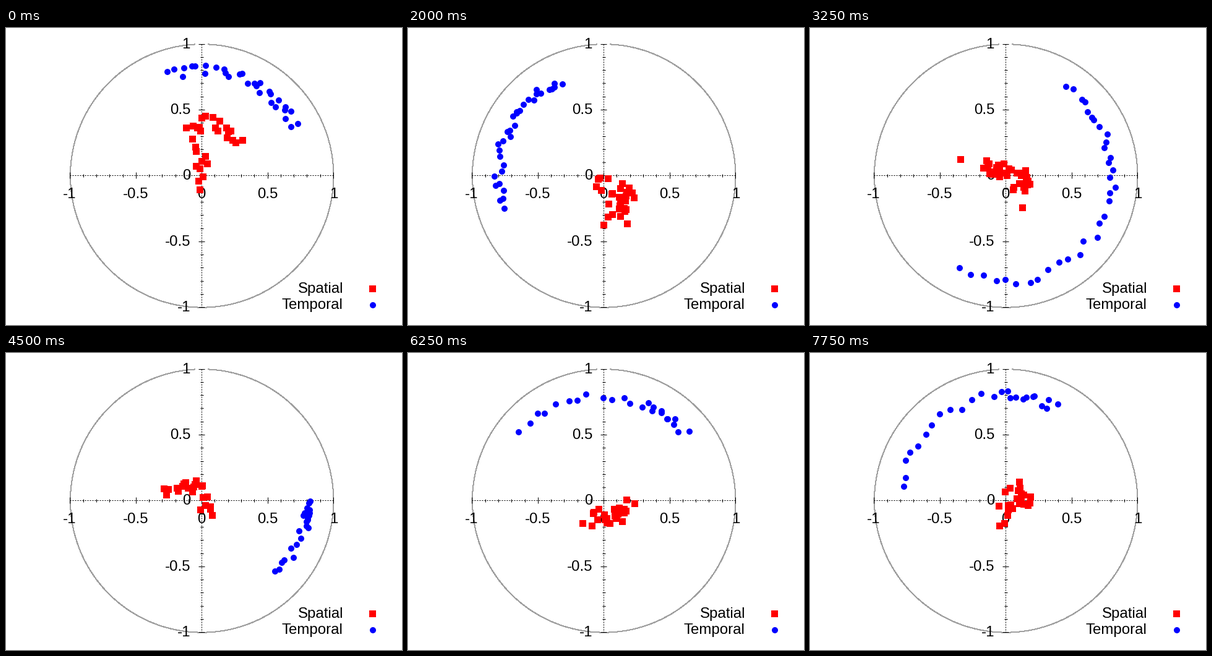
Write a matplotlib script that moves like this. It is 640 px wide and 480 px high and loops after 8000 ms.

```python
import matplotlib.pyplot as plt
import numpy as np
from matplotlib.animation import FuncAnimation
from matplotlib.markers import MarkerStyle
from matplotlib.transforms import Affine2D

W, H, DPI = 640, 480, 100
CX, CY, R = 316.2, 238.4, 212.75
PX = 72 / DPI
FRAMES, STEP = 32, 250

# Temporal arc: step, then first, middle and last angle, turning clockwise
SWEEP = np.array([
    (0, 109, 62, 28),
    (5, 28, 0, -34),
    (8, -162, -209, -246),
    (13, -305, -372, -476),
    (18, -721, -731, -765),
    (22, -953, -1000, -1024),
    (28, -925, -1019, -1055),
    (31, -907, -985, -1018),
])

# Spatial cloud: step, then three points of the bent path it follows
DRIFT = np.array([
    (0, -0.02, -0.06, -0.01, 0.38, 0.3, 0.3),
    (8, 0.02, -0.08, 0.17, -0.14, 0.1, -0.36),
    (13, -0.22, 0.08, 0.03, 0.02, 0.16, -0.12),
    (18, -0.25, 0.08, -0.1, 0.12, 0.08, -0.1),
    (22, -0.08, -0.14, 0.1, -0.14, 0.3, 0.15),
    (28, -0.1, -0.04, -0.03, -0.18, 0.1, -0.24),
    (31, -0.03, -0.13, 0.06, 0.08, 0.2, 0.0),
])

plt.rcParams["font.family"] = "Liberation Sans"
fig = plt.figure(figsize=(W / DPI, H / DPI), dpi=DPI, facecolor="white")
ax = fig.add_axes([0, 0, 1, 1])
ax.set_xlim(0, W)
ax.set_ylim(H, 0)
ax.axis("off")

# the shift centres the dot on a pixel
DOT = MarkerStyle("o", transform=Affine2D().translate(0.05, -0.05))


def line(xs, ys, color="black", **kw):
    ax.plot(xs, ys, color=color, lw=PX, solid_capstyle="butt",
            dash_capstyle="butt", **kw)


def label(x, y, text, ha):
    ax.text(x, y, text, ha=ha, va="baseline", fontsize=24 * PX, zorder=2)


def markers(shape, color, size):
    return ax.plot([], [], ls="", marker=shape, color=color, ms=size * PX,
                   mew=0, zorder=3)[0]


def draw_axes():
    dots = (0, (2, 2))
    line([CX - R, CX + R], [CY, CY], ls=dots)
    line([CX, CX], [CY - R, CY + R], ls=dots)
    for i in range(-10, 11):
        half = 5 if i % 5 == 0 else 2.5
        x, y = CX + R * i / 10, CY - R * i / 10
        line([x, x], [CY - half, CY + half])
        line([CX - half, CX + half], [y, y])
    for v in (-1, -0.5, 0, 0.5, 1):
        label(CX + 213.8 * v, 275, f"{v:g}", "center")
        label(298, CY - R * v + 7, f"{v:g}", "right")
    # the unit circle is open at the top
    a = np.radians(np.linspace(93, 447.3, 400))
    line(CX + 0.5 + R * np.cos(a), CY + 0.5 - R * np.sin(a), "#a0a0a0",
         zorder=1.5, antialiased=False)


def draw_legend():
    label(545, 428, "Spatial", "right")
    label(544, 454, "Temporal", "right")
    markers("s", "red", 11).set_data([592], [421])
    markers(DOT, "blue", 10).set_data([592], [447])


def at_step(keys, step):
    return [np.interp(step, keys[:, 0], col) for col in keys.T[1:]]


def along(values, n):
    """n even samples through a start, a middle and an end value."""
    return np.interp(np.linspace(0, 1, n), (0, 0.5, 1), values)


draw_axes()
draw_legend()
spatial = markers("s", "red", 11)
temporal = markers(DOT, "blue", 10)


def update(step):
    rng = np.random.default_rng(step)
    n = round(np.interp(step, (0, 13, 18, 31), (30, 34, 22, 25)))

    path = at_step(DRIFT, step)
    x = along(path[::2], n) + rng.normal(0, 0.045, n)
    y = along(path[1::2], n) + rng.normal(0, 0.045, n)
    spatial.set_data(CX + R * x, CY - R * y)

    a = np.radians(along(at_step(SWEEP, step), n) + rng.uniform(-2, 2, n))
    r = R * rng.uniform(0.765, 0.84, n)
    temporal.set_data(CX + r * np.cos(a), CY - r * np.sin(a))
    return spatial, temporal


anim = FuncAnimation(fig, update, frames=FRAMES, interval=STEP,
                     repeat=True, repeat_delay=0)
plt.show()
```
